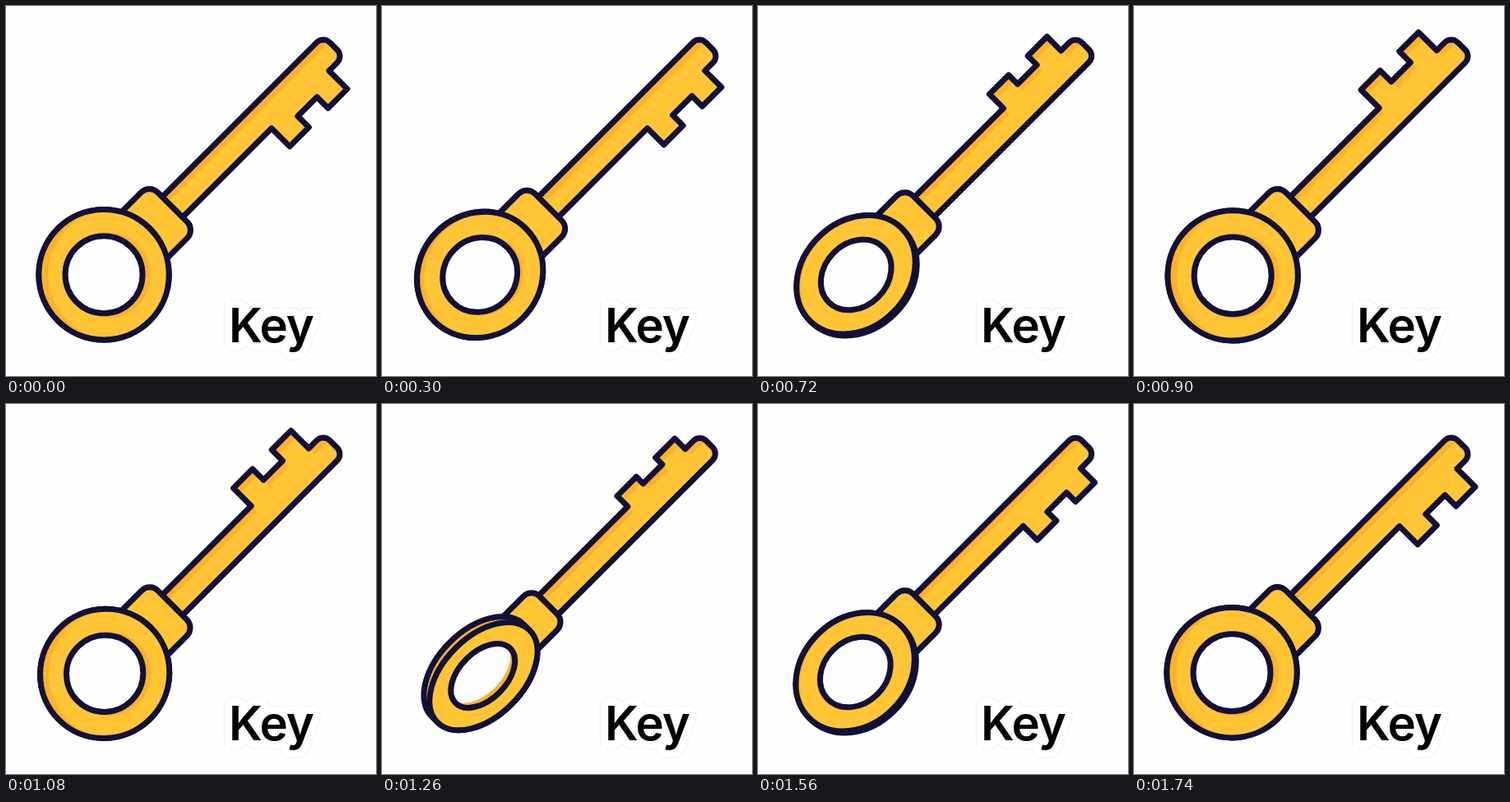
Write an HTML page with a canvas that moves like this. It is 450x450 px and loops after 1800 ms.

```html
<!DOCTYPE html>
<html lang="en">
<head>
<meta charset="utf-8">
<title>Key</title>
<style>
  html, body { margin: 0; width: 100%; height: 100%; overflow: hidden; background: #fefefe; }
  svg, canvas { position: absolute; left: 0; top: 0; width: 450px; height: 450px; }
  text { font: 600 58px Inter, "Liberation Sans", sans-serif; letter-spacing: -1px; }
  .halo { stroke-linejoin: round; }
</style>
</head>
<body>
<canvas id="stage" width="450" height="450"></canvas>
<svg viewBox="0 0 450 450">
  <text class="halo" x="271" y="409" fill="#f1f1f1" stroke="#f1f1f1" stroke-width="21">Key</text>
  <text class="halo" x="271" y="409" fill="#fff" stroke="#fff" stroke-width="19">Key</text>
  <text x="271" y="409">Key</text>
</svg>
<script>
const ctx = document.getElementById('stage').getContext('2d');
const GOLD = '#ffc535', SHADE = '#ffb12b', INK = '#11103a', PAPER = '#fefefe';
const LOOP = 1800, HOLD = 180, STEP = 60, HALF_TURN = 14;
const RING = 79.2, HOLE = 47, DEPTH = 12.5;

const smooth = t => t * t * (3 - 2 * t);

function oval(y, rx, ry) {
  const p = new Path2D();
  p.ellipse(0, y, rx, ry, 0, 0, Math.PI * 2);
  return p;
}

function fill(path, color) {
  ctx.fillStyle = color;
  ctx.fill(path);
}

function clipped(path, draw) {
  ctx.save();
  ctx.clip(path);
  draw();
  ctx.restore();
}

function shifted(path, x, y, color) {
  ctx.save();
  ctx.translate(x, y);
  fill(path, color);
  ctx.restore();
}

// Shaft and teeth; side is +1 or -1 for the edge that carries the teeth
function bladePath(c, s, h) {
  const side = c < 0 ? -1 : 1;
  const w = Math.hypot(17.5 * c, 16 * s);
  const edge = v => Math.max(w, v * Math.abs(c) + h);
  const tip = edge(48.8), notch = edge(29.7), r = 11;
  const p = new Path2D();
  p.moveTo(100, -w * side);
  p.arcTo(394, -w * side, 394, 0, r);
  p.arcTo(394, w * side, 300, w * side, r);
  const teeth = [[369, w], [369, tip], [336, tip], [336, notch],
                 [303, notch], [303, tip], [270, tip], [270, w], [100, w]];
  for (const [u, v] of teeth) p.lineTo(u, v * side);
  p.closePath();
  return p;
}

function drawBlade(c, s, h) {
  const p = bladePath(c, s, h);
  fill(p, SHADE);
  clipped(p, () => shifted(p, 0, 10, GOLD));
  ctx.stroke(p);
}

function drawCollar(c, h) {
  const w = 39.5 * Math.abs(c) + h;
  const r = Math.min(w, 14);
  const p = new Path2D();
  p.roundRect(0, -w, 117, 2 * w, [0, r, r, 0]);
  fill(p, GOLD);
  ctx.stroke(p);
}

function drawBow(c, s, h) {
  const a = Math.abs(c), flat = a < 0.1, thin = a < 0.5;
  const near = s * c < 0 ? -h : h;

  const hull = new Path2D();
  hull.ellipse(0, -h, RING, RING * a, 0, Math.PI, Math.PI * 2);
  hull.ellipse(0, h, RING, RING * a, 0, 0, Math.PI);
  hull.closePath();
  fill(hull, flat ? GOLD : SHADE);
  ctx.stroke(hull);
  if (flat) return;

  const face = oval(near, RING, RING * a);
  const hole = oval(near * 0.8, HOLE, HOLE * a);
  const farHole = oval(-near * 0.8, HOLE, HOLE * a);

  if (thin) {
    // Both rims show through when the ring is seen almost edge-on
    fill(oval(h, RING, RING * a), GOLD);
    ctx.stroke(oval(-near, RING, RING * a));
  } else {
    const k = c ** 4, rim = HOLE + 5 * k;
    fill(face, SHADE);
    clipped(face, () => {
      shifted(face, 8 * k, 8 * k, GOLD);
      shifted(oval(near * 0.8, rim, rim * a), 3 * k, 4 * k, SHADE);
    });
  }
  ctx.stroke(face);

  fill(hole, SHADE);
  clipped(hole, () => fill(farHole, PAPER));
  if (thin) ctx.stroke(farHole);
  ctx.stroke(hole);
}

function render(ms) {
  const t = ms % LOOP;
  const step = t < HOLD ? 0 : Math.floor((t - HOLD) / STEP) + 1;
  const half = Math.floor(step / HALF_TURN);
  const angle = Math.PI * (half + smooth(step / HALF_TURN - half));
  const c = Math.cos(angle), s = Math.sin(angle), h = DEPTH * s ** 4;

  ctx.fillStyle = PAPER;
  ctx.fillRect(0, 0, 450, 450);
  ctx.save();
  ctx.translate(119.6, 327.3);
  ctx.rotate(-Math.PI / 4);
  ctx.lineWidth = 7;
  ctx.lineJoin = 'round';
  ctx.strokeStyle = INK;
  drawBlade(c, s, h);
  drawCollar(c, h);
  ctx.translate(0, -0.8 * c);
  drawBow(c, s, h);
  ctx.restore();
}

const start = performance.now();
function tick() {
  render(performance.now() - start);
  requestAnimationFrame(tick);
}
tick();
</script>
</body>
</html>
```
